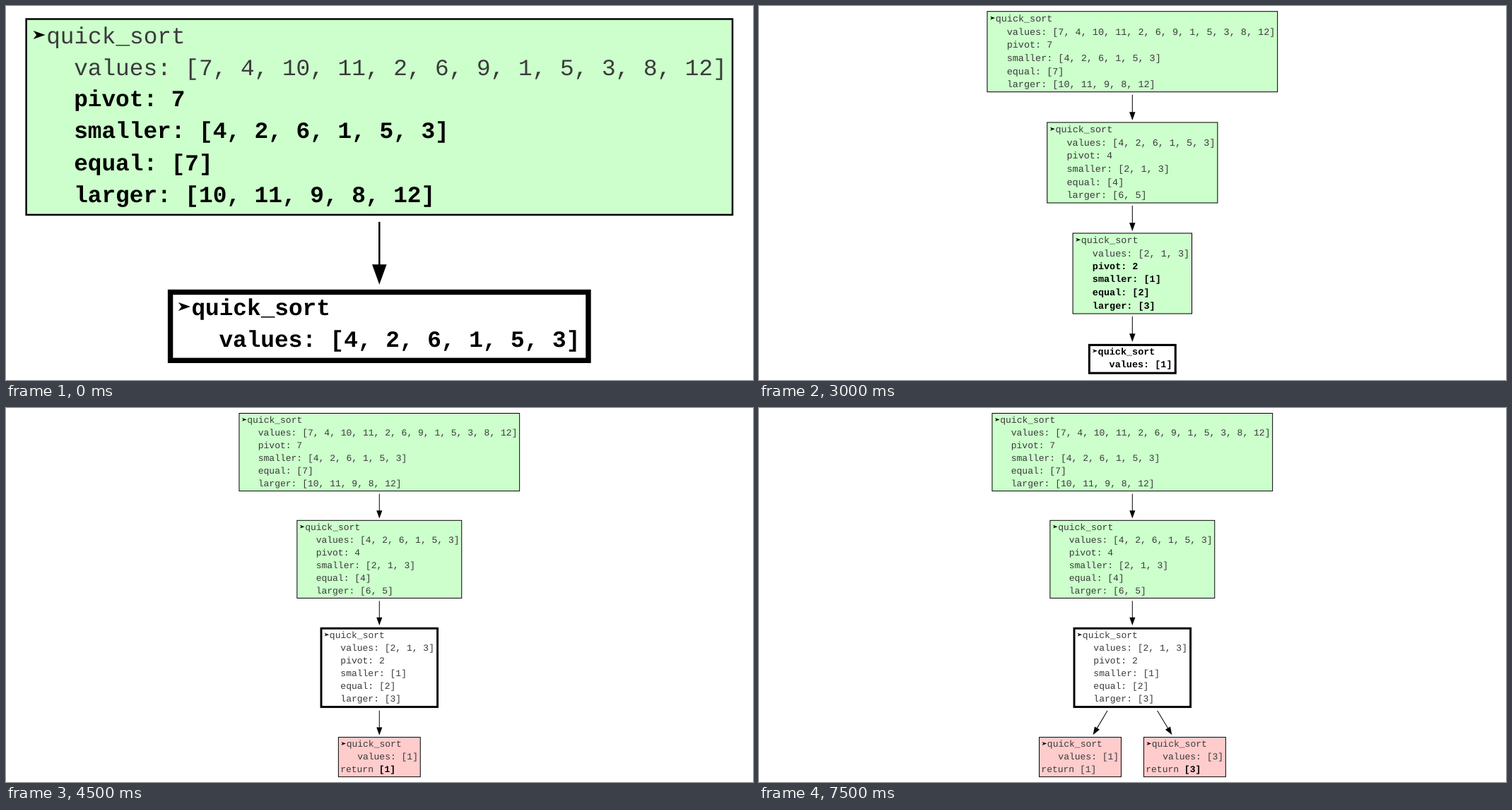
These frames come from a looping animation (1057x530 px, 8 s). An HTML page:

```html
<!DOCTYPE html>
<html lang="en">
<head>
<meta charset="utf-8">
<title>Quick sort call tree</title>
<style>
  html, body { margin: 0; width: 100%; height: 100%; overflow: hidden; background: #fff; }
  svg { display: block; width: 100%; height: 100%; }
  text {
    font: 32.75px "Courier New", "Liberation Mono", monospace;
    fill: #3a3a3a;
    white-space: pre;
    text-rendering: geometricPrecision;
  }
  .bold { font-weight: bold; fill: #000; }
  .scene { visibility: hidden; animation: show 8s step-end infinite; }
  .scene:last-child { animation-name: show-short; }
  @keyframes show { 0% { visibility: visible } 18.75%, 100% { visibility: hidden } }
  @keyframes show-short { 0% { visibility: visible } 6.25%, 100% { visibility: hidden } }
</style>
</head>
<body>
<svg id="stage" viewBox="0 0 1057 530"></svg>
<script>
const CHAR = 19.65, LINE = 45.4, INDENT = 67.5, MID = 528.3;
const THIN = 2.5, THICK = 7.4;
const GREEN = '#ccffcc', RED = '#ffcccc', WHITE = '#ffffff';

const call = (values, pivot, smaller, equal, larger) => ({ values, pivot, smaller, equal, larger });
const root = call('[7, 4, 10, 11, 2, 6, 9, 1, 5, 3, 8, 12]', '7', '[4, 2, 6, 1, 5, 3]', '[7]', '[10, 11, 9, 8, 12]');
const left = call('[4, 2, 6, 1, 5, 3]', '4', '[2, 1, 3]', '[4]', '[6, 5]');
const low = call('[2, 1, 3]', '2', '[1]', '[2]', '[3]');
const one = call('[1]'), three = call('[3]');

// Modes: fresh = just called, split = lists just filled, open = waiting,
// active = current again, returned = result is new, done = result is old
const node = (data, mode, top, cx = MID) => ({ data, mode, top, cx });

const scenes = [
  { k: 1, nodes: [node(root, 'split', 18.5), node(left, 'fresh', 405.5)] },
  { k: 0.584, nodes: [node(root, 'open', 11), node(left, 'split', 234), node(low, 'fresh', 459.5)] },
  { k: 0.411, nodes: [node(root, 'open', 7.7), node(left, 'open', 165), node(low, 'split', 322),
                      node(one, 'fresh', 480.4)] },
  { k: 0.397, nodes: [node(root, 'open', 7.5), node(left, 'open', 159.3), node(low, 'active', 312.3),
                      node(one, 'returned', 466.6)] },
  { k: 0.4005, nodes: [node(root, 'open', 7.5), node(left, 'open', 160.4), node(low, 'open', 313.2),
                       node(one, 'done', 466, 452.7), node(three, 'fresh', 474.8, 604.5)],
    forks: [[492.3, 428.5, 471.5, 462.5], [564.3, 428.5, 590, 469.3]] },
  { k: 0.397, nodes: [node(root, 'open', 7.5), node(left, 'open', 159.3), node(low, 'active', 312.3),
                      node(one, 'done', 466.6, 454.5), node(three, 'returned', 466.6, 602.4)],
    forks: [[493, 429, 472.8, 463], [563.7, 429, 584.2, 463]] }
];

const isFocus = n => n.mode === 'fresh' || n.mode === 'active';
const isReturn = n => n.mode === 'returned' || n.mode === 'done';

function size(n) {
  const rows = isReturn(n) ? 3 : n.data.pivot && n.mode !== 'fresh' ? 6 : 2;
  return {
    w: INDENT + (8 + n.data.values.length) * CHAR + 8.3 + (isFocus(n) ? 4.7 : 0),
    h: rows * LINE + 5 + (n.mode === 'fresh' ? 1 : n.mode === 'active' ? 3 : 0)
  };
}

function row(x, i, str, bold) {
  const y = 34.5 + i * LINE - (bold ? 2 : 0);
  return `<text x="${x}" y="${y}"${bold ? ' class="bold"' : ''}>${str}</text>`;
}

function drawNode(n, k) {
  const { w, h } = size(n), focus = isFocus(n), fresh = n.mode === 'fresh';
  const dx = focus ? 1.3 : 0, dy = fresh ? -2 : 0;
  const fill = focus ? WHITE : isReturn(n) ? RED : GREEN;
  let out = `<rect width="${w}" height="${h}" fill="${fill}" stroke="#000" stroke-width="${focus ? THICK : THIN}"/>`;
  out += `<path transform="translate(${dx} ${dy})" d="M10 16.5L27 22.5L10 28.5L14.5 22.5Z"/>`;
  out += row(dx + 28.5, 0, 'quick_sort', fresh);
  out += row(dx + INDENT, 1, 'values: ' + n.data.values, fresh);
  if (isReturn(n)) {
    out += row(7, 2, 'return', false);
    out += row(7 + 7 * CHAR, 2, n.data.values, n.mode === 'returned');
  } else if (!fresh) {
    ['pivot', 'smaller', 'equal', 'larger'].forEach((key, i) => {
      out += row(dx + INDENT, i + 2, `${key}: ${n.data[key]}`, n.mode === 'split');
    });
  }
  return `<g transform="translate(${n.cx - w * k / 2} ${n.top}) scale(${k})">${out}</g>`;
}

function drawArrow([x1, y1, x2, y2], k) {
  const len = Math.hypot(x2 - x1, y2 - y1) / k;
  const angle = Math.atan2(y2 - y1, x2 - x1) * 180 / Math.PI;
  return `<g transform="translate(${x1} ${y1}) rotate(${angle}) scale(${k})">` +
    `<path d="M0 0H${len - 26}" stroke="#000" stroke-width="${THIN}"/>` +
    `<path d="M${len + 0.8} 0l-28.5 -10.3v20.6z"/></g>`;
}

function drawScene({ k, nodes, forks = [] }, i) {
  const links = [...forks];
  nodes.slice(1).forEach((n, j) => {
    const up = nodes[j];
    if (n.cx !== MID) return;
    const y1 = up.top + (size(up).h + (isFocus(up) ? 13 : 10)) * k;
    const y2 = n.top - (isFocus(n) ? 11.5 : 8) * k;
    links.push([MID, y1, MID, y2]);
  });
  return `<g class="scene" style="animation-delay:${i * 1.5 - 8}s">` +
    nodes.map(n => drawNode(n, k)).join('') +
    links.map(l => drawArrow(l, k)).join('') + '</g>';
}

document.getElementById('stage').innerHTML = scenes.map(drawScene).join('');
</script>
</body>
</html>
```
